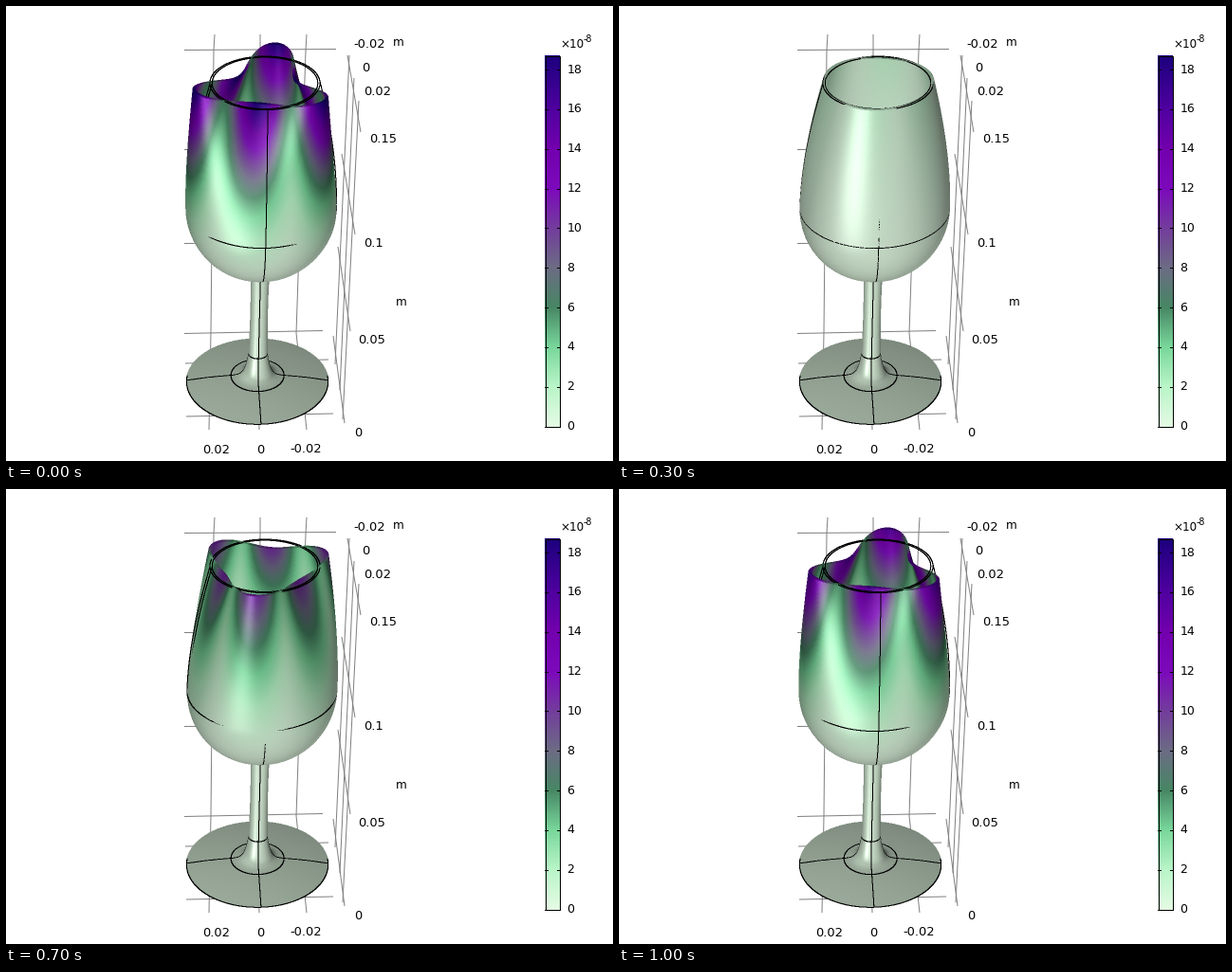
A matplotlib script for the animation above (1.1 s loop, 640x480 px).

```python
import numpy as np
import matplotlib.pyplot as plt
from matplotlib.animation import FuncAnimation
from matplotlib.collections import LineCollection
from matplotlib.colors import LinearSegmentedColormap
from matplotlib.patches import Rectangle

W, H, SS = 640, 480, 2
STEPS, INTERVAL = 11, 100
PHASE_STEP = np.radians(31.3)
VMAX = 18.7

STOPS = [(0, "#e4fbe4"), (2, "#b9f5c8"), (4, "#79d79b"), (6, "#478764"),
         (8, "#6c6c84"), (10, "#733d9c"), (12, "#7c0abc"), (14, "#7300ae"),
         (16, "#5000a0"), (VMAX, "#1c007d")]
AURORA = LinearSegmentedColormap.from_list(
    "aurora", [(v / VMAX, c) for v, c in STOPS], N=512)

# Camera: the y axis points at the viewer, z is up, units are pixels
DIST, ELEV = 2260, np.radians(33.25)
SE, CE = np.sin(ELEV), np.cos(ELEV)
CAM = DIST * np.array([0, CE, SE])
KEY = np.array([-.33, .72, .61])
FILL = np.array([.30, .65, -.70])
GLOSS = np.array([-.30, .93, .20])

# Glass dimensions
BASE, RING, RIM = -187.5, 39.0, 187.5
R_MAX, R_RIM, R_STEM, LIP = 78.0, 55.4, 10.0, 2.2
SEAM = np.radians(2.9)
LOBE = np.radians(-9)
SWING, LIFT = 20.5, 5.0


def project(p):
    """Screen x, screen y and nearness of world points."""
    x, y, z = p
    near = y * CE + z * SE
    q = DIST / (DIST - near)
    sy = 245 - q * (z * CE - y * SE)
    axis_y = 245 - DIST / (DIST - z * SE) * z * CE
    return 265 + q * x + .0255 * (395 - axis_y), sy, near


def ring_points(r, z, th):
    r, z, th = np.broadcast_arrays(r, z, th)
    return np.array([r * np.sin(th), r * np.cos(th), z])


def revolve(r, z, n):
    th = np.linspace(-np.pi, np.pi, n)
    return ring_points(r[:, None], z[:, None], th[None, :])


def shade(p, value):
    n = np.cross(np.gradient(p, axis=1), np.gradient(p, axis=2), axis=0)
    n /= np.linalg.norm(n, axis=0) + 1e-9
    n *= np.sign((n * (CAM[:, None, None] - p)).sum(0))

    def lit(v):
        return np.clip(np.tensordot(v, n, 1), 0, None)[..., None]

    light = .36 + .42 * lit(KEY) + .30 * lit(FILL)
    rgb = AURORA(value / VMAX)[..., :3] * light + .27 * lit(GLOSS) ** 42
    return np.clip(rgb, 0, 1)


def flat(p, rgb, bias=0):
    x, y, near = (a.ravel() for a in project(p))
    return x, y, near + bias, rgb.reshape(-1, 3)


def surface(p, value):
    return flat(p, shade(p, value))


def wire(r, z, th, bias):
    p = ring_points(r, z, th)
    return flat(p, np.zeros((p[0].size, 3)), bias)


def upper_r(z):
    return R_MAX - (R_MAX - R_RIM) * ((z - RING) / (RIM - RING)) ** 1.7


def foot_z(r):
    return BASE + 8 * (1 - (r / R_MAX) ** 2) + 29 * np.exp((R_STEM - r) / 3.6)


# Profiles
ang = np.linspace(np.pi / 2, 0, 210)
z_up = np.linspace(RING, RIM, 280)
bowl_r = np.r_[R_MAX * np.cos(ang), upper_r(z_up[1:]),
               R_RIM - np.linspace(.3, LIP, 6)]
bowl_z = np.r_[RING - R_MAX * np.sin(ang), z_up[1:], np.full(6, RIM)]
foot_r = R_STEM + (R_MAX - R_STEM) * np.linspace(0, 1, 230) ** 2
stem_z = np.linspace(foot_z(R_STEM), RING - R_MAX, 170)
s = np.linspace(0, 1, 170)
stem_r = 8.8 + 1.2 * (1 - s) ** 3 + 1.1 * s ** 4

# Vibration mode with three lobes
th = np.linspace(-np.pi, np.pi, 800)[None, :]
reach = (np.clip((bowl_z + 10) / (RIM + 10), 0, None) ** 1.75)[:, None]
c3, s3 = np.cos(3 * (th - LOBE)), np.sin(3 * (th - LOBE))
u_r, u_t = SWING * reach * c3, -SWING / 3 * reach * s3
MODE = np.array([u_r * np.sin(th) + u_t * np.cos(th),
                 u_r * np.cos(th) - u_t * np.sin(th),
                 LIFT * reach * c3])
SIZE = VMAX * reach * np.hypot(c3, s3 / 3)
BOWL = revolve(bowl_r, bowl_z, 800)

# Fixed parts: foot, stem and the undeformed edges
turn = np.linspace(-np.pi, np.pi, 1600)
front = np.linspace(-1.68, 1.68, 1200)
foot = revolve(foot_r, foot_z(foot_r), 720)
stem = revolve(stem_r, stem_z, 200)
edge_r = R_STEM + (R_MAX - R_STEM) * np.linspace(0, 1, 500) ** 2
z_edge = np.linspace(RING, RIM, 500)
FIXED = [
    surface(foot, np.zeros(foot[0].shape)),
    surface(stem, np.zeros(stem[0].shape)),
    wire(R_MAX, BASE, front, 1.2),
    wire(29.2, foot_z(29.2), turn, 1.2),
    wire(R_STEM, foot_z(R_STEM), turn, 1.2),
    wire(stem_r, stem_z, SEAM, 1.2),
    wire(edge_r, foot_z(edge_r), SEAM, 1.2),
    wire(R_MAX, RING, turn, .4),
    wire(R_RIM, RIM, turn, .1),
    wire(R_RIM - LIP, RIM, turn, .1),
    wire(bowl_r[:210], bowl_z[:210], SEAM, .4),
    wire(upper_r(z_edge), z_edge, SEAM, .1),
    wire(upper_r(z_edge) - LIP, z_edge, SEAM - np.pi / 2, .1),
]
for side in (-np.pi / 2, np.pi / 2):
    FIXED.append(wire(edge_r, foot_z(edge_r), side, 1.2))
    FIXED.append(wire(upper_r(z_edge), z_edge, SEAM + side, .4))


def render(k):
    # Swings out and back the same way, stopping short of the far extreme
    amp = -np.cos(PHASE_STEP * min(k, STEPS - k))
    parts = FIXED + [surface(BOWL + amp * MODE, abs(amp) * SIZE)]
    x, y, near, rgb = (np.concatenate(a) for a in zip(*parts))
    order = np.argsort(near)
    row = W * SS
    idx = (np.floor(SS * y - .5) * row + np.floor(SS * x - .5)).astype(int)
    idx = (idx[order][:, None] + [0, 1, row, row + 1]).ravel()
    # Points are written far to near, so the nearest one stays
    top = np.full(H * SS * row, -1)
    top[idx] = np.repeat(order, 4)
    hit = top >= 0
    img = np.zeros((top.size, 4))
    img[hit, :3] = rgb[top[hit]]
    img[hit, 3] = 1
    img = img.reshape(H, SS, W, SS, 4).mean((1, 3))
    img[..., :3] /= np.maximum(img[..., 3:], 1e-6)
    return np.clip(img, 0, 1)


fig = plt.figure(figsize=(8, 6), dpi=80, facecolor="white")
ax = fig.add_axes([0, 0, 1, 1])
ax.axis("off")


def label(x, y, text, px=13, ha="center"):
    ax.text(x, y, text, fontsize=px * .9, family="DejaVu Sans",
            ha=ha, va="center", color="black")


# Axis box
grid = [
    [(188, 46.5), (348, 45.5)], [(188, 151.5), (340, 151)],
    [(188, 250.5), (338, 249)], [(188, 345.5), (334, 342.5)],
    [(189, 377), (340, 373)], [(190, 433), (345, 430)],
    [(220, 30), (219, 47), (216, 345), (214, 447)],
    [(268, 30), (268, 47), (264, 345), (267, 447)],
    [(317, 30), (316, 47), (306, 345), (317, 447)],
    [(360, 52), (374, 133)], [(354, 156), (368, 241)],
    [(350, 254), (363, 343)], [(345, 348), (357, 440)],
    [(362, 52), (347, 378)], [(367, 76), (352, 405)],
    [(372, 100), (355, 436)],
]
ax.add_collection(LineCollection(grid, colors="#808080", linewidths=.9, zorder=1))

for x, y, text in [(383.5, 41, "-0.02"), (379, 65.5, "0"), (391.5, 90.5, "0.02"),
                   (398, 141, "0.15"), (388, 250, "0.1"), (385.5, 352, "0.05"),
                   (371.5, 450, "0"), (221.5, 468.5, "0.02"), (268.5, 468, "0"),
                   (316.5, 467.5, "-0.02")]:
    label(x, y, text)
label(413.5, 38, "m", 12)
label(416.5, 312, "m", 12)

# Colour bar
X0, X1, Y0, Y1 = 568, 584, 444, 52
ax.imshow(AURORA(np.linspace(1, 0, Y0 - Y1))[:, None], extent=(X0, X1, Y0, Y1),
          interpolation="nearest", aspect="auto", zorder=2)
ax.add_patch(Rectangle((X0 + .5, Y1 + .5), X1 - X0 - 1, Y0 - Y1 - 1, fill=False,
                       ec="black", lw=.9, zorder=3))
for v in range(0, 20, 2):
    y = Y0 - .5 - v * (Y0 - Y1 - 1) / VMAX
    ax.plot([X0, X0 + 3], [y, y], color="black", lw=.9, zorder=3)
    ax.plot([X1 - 3, X1], [y, y], color="black", lw=.9, zorder=3)
    label(591.5, y, str(v), 12.5, "left")
label(584, 40, "×10", 12, "left")
label(609, 35.5, "-8", 9.5, "left")

pictures = [render(k) for k in range(STEPS)]
glass = ax.imshow(pictures[0], extent=(0, W, H, 0), interpolation="nearest",
                  aspect="auto", zorder=4)
ax.set_xlim(0, W)
ax.set_ylim(H, 0)


def update(k):
    glass.set_data(pictures[k])
    return [glass]


anim = FuncAnimation(fig, update, frames=STEPS, interval=INTERVAL,
                     repeat=True, repeat_delay=0)
plt.show()
```
